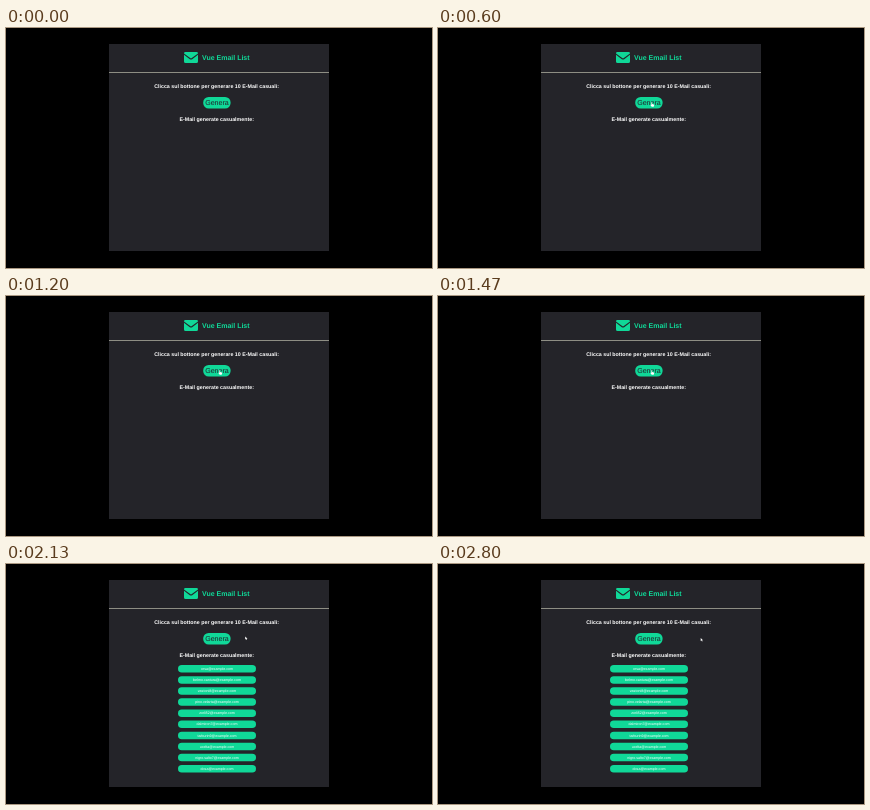
Recreate the animation shown at these times as an HTML page. Size 426 by 240 pixels, loop 2.87 s.

```html
<!DOCTYPE html>
<html lang="it">
<head>
<meta charset="utf-8">
<title>Vue Email List</title>
<style>
  html, body { margin: 0; width: 100%; height: 100%; overflow: hidden; background: #000; }
  svg { display: block; width: 100vw; height: 100vh; }
  text {
    font-family: "Liberation Sans", Arial, sans-serif;
    text-anchor: middle;
    text-rendering: geometricPrecision;
  }
  .accent { fill: #10d898; }
  .label { font-weight: bold; font-size: 5.3px; fill: #fff; }
  .mail text { font-size: 3.6px; fill: #fff; }
</style>
</head>
<body>
<svg viewBox="0 0 426 240">
  <rect x="103" y="16" width="220" height="207" fill="#242429"/>
  <path class="accent" d="M179.4 24H190.6Q192 24 192 25.4L185.8 30.1Q185 30.7 184.2 30.1L178 25.4Q178 24 179.4 24ZM178 26.8 183.8 31.2Q185 32 186.2 31.2L192 26.8V33.4Q192 35 190.4 35H179.6Q178 35 178 33.4Z"/>
  <text class="accent" x="219.8" y="32" font-size="7" font-weight="bold">Vue Email List</text>
  <rect x="103" y="44" width="220" height="1" fill="#8e8e84"/>
  <text class="label" x="210.6" y="59.8">Clicca sul bottone per generare 10 E-Mail casuali:</text>
  <rect class="accent" x="197.2" y="69" width="27.4" height="11.5" rx="5.5"/>
  <text x="211" y="77.2" font-size="7.1" fill="#20222c">Genera</text>
  <text class="label" x="210.7" y="92.8">E-Mail generate casualmente:</text>
  <g id="list"></g>
  <g id="cursor" fill="#fff">
    <path id="arrow" d="M-.8-1.6V1.5L0 .9.5 1.9 1 1.7.6.7H1.5Z"/>
    <path id="hand" d="M-1-2.2H-.2V-.4L1.8 0V1.4L1.3 2.4H-.6L-1.9.5-1 .3Z"/>
  </g>
</svg>
<script>
const LOOP = 2870;
const $ = id => document.getElementById(id);

const users = ["orsa", "belmo.cantura", "vastoni8", "pino.velarta", "zorli52",
  "dalmiron7", "tarburin9", "ucelta", "nigro.salto7", "dosa"];
$("list").innerHTML = users.map((user, i) => {
  const y = 104.8 + i * 11.1;
  return `<g class="mail"><rect class="accent" x="172" y="${y - 3.75}" width="78" height="7.5" rx="3.75"/>
    <text x="211" y="${y + 1.1}">${user}@example.com</text></g>`;
}).join("");
const mails = [...document.querySelectorAll(".mail")];

// Arrival time of each reply, in ms
const arrivals = [1670, 1730, 1730, 1800, 1800, 1870, 1870, 1930, 2000, 2000];

// Pointer path: time, x, y
const path = [[130, 321, 130], [530, 214.3, 76.4], [1870, 214.3, 76.4],
  [2130, 240, 74], [2400, 261, 75], [2600, 263.5, 75.5], [LOOP, 263.5, 75.5]];

function pointer(t) {
  const i = Math.max(1, path.findIndex(p => p[0] >= t));
  const [a, b] = [path[i - 1], path[i]];
  const u = (t - a[0]) / (b[0] - a[0]);
  const k = u * u * (3 - 2 * u);
  return [a[1] + (b[1] - a[1]) * k, a[2] + (b[2] - a[2]) * k];
}

const show = (el, on) => el.setAttribute("visibility", on ? "visible" : "hidden");

function draw(t) {
  mails.forEach((mail, i) => show(mail, t >= arrivals[i]));

  const visible = t >= path[0][0];
  const [x, y] = pointer(Math.max(t, path[0][0]));
  const over = x > 197 && x < 225 && y > 69 && y < 80.5;
  $("cursor").setAttribute("transform", `translate(${x} ${y})`);
  show($("arrow"), visible && !over);
  show($("hand"), visible && over);
}

function tick() {
  draw(performance.now() % LOOP);
  requestAnimationFrame(tick);
}
tick();
</script>
</body>
</html>
```
